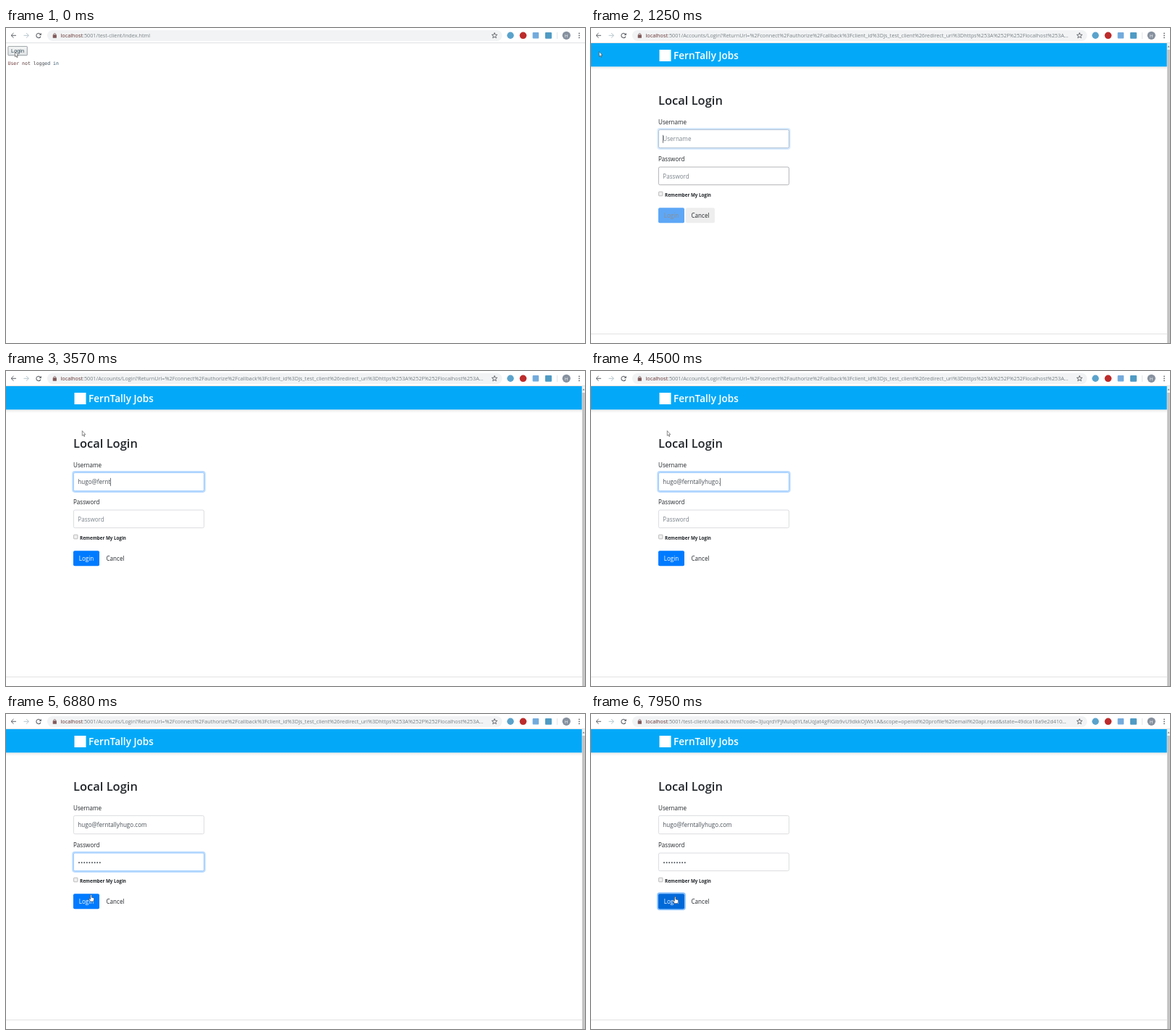
These frames come from a looping animation (800 px wide and 435 px high, 8000 ms). An HTML page with a canvas:

```html
<!DOCTYPE html>
<html lang="en">
<head>
<meta charset="utf-8">
<title>Login flow</title>
<style>
html, body { margin: 0; width: 100%; height: 100%; overflow: hidden; background: #fff; }
canvas { display: block; width: 800px; height: 435px; }
</style>
</head>
<body>
<canvas id="stage"></canvas>
<script>
const LOOP = 8000;
const PAGE_SHOWN = 1250;
const PASSWORD_FOCUS = 5270;
const PASSWORD_FILLED = 5730;
const BLINK = 530;
const KEY_DELAY = 78;

const UI = '"Open Sans", "Noto Sans", sans-serif';
const MONO = '"DejaVu Sans Mono", "Liberation Mono", monospace';
const ARIAL = '"Liberation Sans", Arial, sans-serif';
const BODY = `8.1px ${UI}`;
const INK = '#212529';
const ICON = '#5f6368';

const canvas = document.getElementById('stage');
const ctx = canvas.getContext('2d');
const ratio = window.devicePixelRatio || 1;
canvas.width = 800 * ratio;
canvas.height = 435 * ratio;

// The address is typed in short bursts at an even key rate.
const bursts = [
  ['hugo', 2390], ['@', 2870], ['fer', 3100], ['ntal', 3490], ['ly', 3870],
  ['hu', 4110], ['go', 4340], ['.', 4500], ['com', 4640]
];
const TYPING_START = bursts[0][1];

function typedText(t) {
  return bursts.map(([part, start]) =>
    part.slice(0, Math.max(0, Math.floor((t - start) / KEY_DELAY) + 1))).join('');
}

function pageUrl(t) {
  if (t < 870) return 'test-client/index.html';
  if (t < 7620) return 'Accounts/Login?ReturnUrl=%2Fconnect%2Fauthorize%2Fcallback%3Fclient_id%3Djs_test_client%26redirect_uri%3Dhttps%253A%252F%252Flocalhost%253A…';
  return 'test-client/callback.html?code=3JuqrdYPjMuIq6YLfaUqJat4gFlGib9vU9dkkOjWs1A&scope=openid%20profile%20email%20api.read&state=49dca18a9e2d410…';
}

const between = (t, from, to) => t >= from && t < to;
const ramp = (t, start, duration) => Math.min(1, Math.max(0, (t - start) / duration));
const easeOut = u => 1 - (1 - u) ** 2;
const lerp = (a, b, k) => a + (b - a) * k;
const mix = (a, b, k) => `rgb(${a.map((v, i) => Math.round(lerp(v, b[i], k))).join(',')})`;
const blinkOn = (t, since) => t >= since && (t - since) % (2 * BLINK) < BLINK;

function pointerAt(t) {
  const moves = [
    { x: 11.3, y: 32.6, start: 300, duration: 10 },
    { x: 105.3, y: 82.6, start: 1380, duration: 400 },
    { x: 127.5, y: 227.3, start: 6240, duration: 110 },
    { x: 116.3, y: 252, start: 6540, duration: 510 }
  ];
  let x = 12.5, y = 33;
  for (const move of moves) {
    const k = easeOut(ramp(t, move.start, move.duration));
    x = lerp(x, move.x, k);
    y = lerp(y, move.y, k);
  }
  return [x, y];
}

function rect(x, y, w, h, fill) {
  ctx.fillStyle = fill;
  ctx.fillRect(x, y, w, h);
}

function round(x, y, w, h, r, fill, stroke, line = 0.8) {
  ctx.beginPath();
  ctx.roundRect(x, y, w, h, r);
  if (fill) { ctx.fillStyle = fill; ctx.fill(); }
  if (stroke) { ctx.strokeStyle = stroke; ctx.lineWidth = line; ctx.stroke(); }
}

function arc(x, y, r, from, to, color, line) {
  ctx.beginPath();
  ctx.arc(x, y, r, from, to);
  ctx.strokeStyle = color;
  ctx.lineWidth = line;
  ctx.stroke();
}

function dot(x, y, r, fill) {
  ctx.beginPath();
  ctx.arc(x, y, r, 0, Math.PI * 2);
  ctx.fillStyle = fill;
  ctx.fill();
}

function shape(d, x, y, fill, stroke, line = 1) {
  const outline = new Path2D(d);
  ctx.save();
  ctx.translate(x, y);
  if (fill) { ctx.fillStyle = fill; ctx.fill(outline); }
  if (stroke) { ctx.strokeStyle = stroke; ctx.lineWidth = line; ctx.stroke(outline); }
  ctx.restore();
}

function text(str, x, y, font, color, align = 'left') {
  ctx.font = font;
  ctx.fillStyle = color;
  ctx.textAlign = align;
  ctx.fillText(str, x, y);
  return ctx.measureText(str).width;
}

function gradient(x0, y0, x1, y1, ...colors) {
  const g = ctx.createLinearGradient(x0, y0, x1, y1);
  colors.forEach((c, i) => g.addColorStop(i / (colors.length - 1), c));
  return g;
}

function reloadIcon(isLoading) {
  if (isLoading) {
    shape('M-3.2-3.2L3.2 3.2M3.2-3.2L-3.2 3.2', 45.2, 10.4, null, ICON, 1.1);
    return;
  }
  arc(45, 10.4, 3.1, 0.35, Math.PI * 1.78, ICON, 1.1);
  shape('M0 0V3.2H-3.2Z', 48.8, 6.8, ICON);
}

function star(cx, cy) {
  ctx.beginPath();
  for (let i = 0; i < 10; i++) {
    const r = i % 2 ? 1.7 : 4;
    const a = -Math.PI / 2 + i * Math.PI / 5;
    ctx.lineTo(cx + r * Math.cos(a), cy + r * Math.sin(a));
  }
  ctx.closePath();
  ctx.strokeStyle = ICON;
  ctx.lineWidth = 0.9;
  ctx.stroke();
}

function browserBar(t) {
  rect(0, 0, 800, 20, '#fff');
  rect(0, 20, 800, 1, '#dfe1e3');
  shape('M3.5 0H-3.3M0-3.3L-3.4 0L0 3.3', 10.5, 10.3, null, ICON);
  shape('M-3.5 0H3.3M0-3.3L3.4 0L0 3.3', 28, 10.3, null, '#b6c6cc');
  reloadIcon(between(t, 620, PAGE_SHOWN) || between(t, 7300, 7950));
  round(57, 3, 628.5, 15, 7.5, '#f1f3f4');

  round(64.7, 9.3, 5.2, 4.4, 0.5, '#80595a');
  arc(67.3, 9, 1.5, Math.PI, 0, '#80595a', 0.8);

  const font = `7.28px ${UI}`;
  const hostWidth = text('localhost', 75.5, 13, font, '#643030');
  text(':5001/' + pageUrl(t), 75.5 + hostWidth, 13, font, '#7a8085');

  star(675, 10.5);
  dot(697, 10.3, 4.7, '#5aa3cc');
  dot(714.5, 10.3, 4.8, '#bd2c2c');
  round(727.6, 6, 8.6, 8.6, 1, '#73abdd');
  round(745, 6, 9, 8.8, 1, '#4f9bc4');
  rect(761, 6, 0.8, 9, '#dcdfe2');
  dot(774.3, 10.3, 5.6, '#87919f');
  text('H', 774.3, 12.6, `6px ${UI}`, '#fff', 'center');
  for (let i = -1; i <= 1; i++) dot(792, 10.3 + i * 3, 0.9, ICON);
}

function startPage(t) {
  const pressed = between(t, 540, 710);
  const face = pressed
    ? gradient(0, 25, 0, 38, '#dfe3e5', '#eef0f0')
    : gradient(0, 25, 0, 38, '#f6f7f7', '#dee2e4');
  round(2.9, 25.4, 26.4, 12.4, 0.6, face, '#868d91', 0.8);
  text('Login', 16.1, 33.8, `7.35px ${ARIAL}`, '#2c4450', 'center');
  const ink = gradient(2, 0, 73, 0, '#702c2c', '#4c3c3c', '#2d566c');
  text('User not logged in', 2.5, 51.2, `6.5px ${MONO}`, ink);
}

function field(y, h, focus, appear) {
  if (focus > 0) {
    round(92.3, y - 1.3, 182.4, h + 2.6, 2.8, null, `rgba(0,123,255,${0.27 * focus})`, 2);
  }
  const gray = lerp(90, 210, appear);
  const border = mix([gray, gray + 2, gray + 6], [128, 189, 255], focus * appear);
  round(93.4, y, 180.2, h, 2, '#fff', border, 0.8);
}

function caret(x, y) {
  rect(x, y - 8.6, 0.7, 11, '#333b42');
}

function brandHeader() {
  rect(0, 21, 796, 32.3, '#03a9f8');
  rect(0, 53.3, 796, 5, gradient(0, 53, 0, 58, 'rgba(0,0,0,0.09)', 'rgba(0,0,0,0)'));
  rect(94.5, 30, 16, 16, '#fff');
  text('FernTally Jobs', 114, 43, `600 13.6px ${UI}`, '#fff');
}

function scrollbar() {
  rect(795.7, 21, 4.3, 414, '#f1f1f1');
  rect(796.2, 30, 3.6, 405, '#c1c1c1');
  shape('M-1.5 1L0-1L1.5 1Z', 798, 25.5, '#777');
}

function usernameField(t, appear) {
  const value = typedText(t);
  text('Username', 93, 132.8, BODY, INK);
  field(140.4, 25.2, appear - ramp(t, 5230, 180), appear);
  const width = text(value || 'Username', 99.3, 156.4, BODY, value ? '#495057' : '#7d858c');
  const typing = t >= TYPING_START;
  if (t < PASSWORD_FOCUS && (typing || blinkOn(t, PAGE_SHOWN))) {
    caret(99.3 + (typing ? width : 0), 156.4);
  }
}

function passwordField(t, appear) {
  text('Password', 93, 184.4, BODY, INK);
  field(192, 24.6, ramp(t, 5250, 180) - ramp(t, 7160, 200), appear);
  const filled = t >= PASSWORD_FILLED;
  if (filled) {
    for (let i = 0; i < 9; i++) dot(101 + i * 3.6, 205.2, 1, '#495057');
  } else {
    text('Password', 99.3, 207.9, BODY, '#7d858c');
  }
  if (between(t, PASSWORD_FOCUS, PASSWORD_FILLED + BLINK)) {
    caret(filled ? 132.6 : 99.3, 207.9);
  }
}

function buttons(t, appear) {
  const glow = ramp(t, 7160, 200);
  if (glow) round(92.2, 247.4, 37.6, 22.6, 3, null, `rgba(0,123,255,${0.45 * glow})`, 2.2);
  const blue = [0, lerp(123, 105, ramp(t, 6880, 150)), lerp(255, 217, ramp(t, 6880, 150))];
  round(93, 248.2, 36, 21, 2, mix([232, 232, 232], blue, appear));
  text('Login', 111, 262, BODY, mix([80, 80, 80], [255, 255, 255], appear ** 2), 'center');
  round(131, 248.2, 40, 21, 2, `rgba(0,0,0,${0.16 * (1 - appear)})`);
  text('Cancel', 151, 262, BODY, INK, 'center');
}

function loginPage(t) {
  const appear = ramp(t, 1150, 170);
  brandHeader();
  text('Local Login', 93, 106.2, `600 16.5px ${UI}`, INK);
  usernameField(t, appear);
  passwordField(t, appear);
  round(93.6, 226.2, 5.4, 5.6, 0.6, '#f0f0f0', between(t, 6350, 6750) ? '#777' : '#a3a3a3', 0.7);
  text('Remember My Login', 102, 233, `bold 6.26px ${UI}`, INK);
  buttons(t, appear);
  rect(0, 422, 796, 0.8, '#dcdcdc');
  scrollbar();
}

function drawPointer(t) {
  const [x, y] = pointerAt(t);
  const arrow = 'M0 0V6.8L1.5 5.4L2.6 7.9L3.5 7.5L2.5 5.1H4.5Z';
  const hand = 'M-.8 .7Q0-.3 .8 .7V4L3.6 4.6Q4.4 5 4.2 6.5L3.5 9.6H-.8L-3 6.3Q-2.8 5.2-1.7 5.8L-.8 6.6Z';
  shape(y > 247 ? hand : arrow, x, y, '#fff', '#333', 0.55);
}

function draw(t) {
  ctx.setTransform(ratio, 0, 0, ratio, 0, 0);
  rect(0, 0, 800, 435, '#fff');
  if (t < PAGE_SHOWN) startPage(t);
  else loginPage(t);
  browserBar(t);
  drawPointer(t);
}

const begin = performance.now();
function tick() {
  draw((performance.now() - begin) % LOOP);
  requestAnimationFrame(tick);
}
tick();
</script>
</body>
</html>
```
